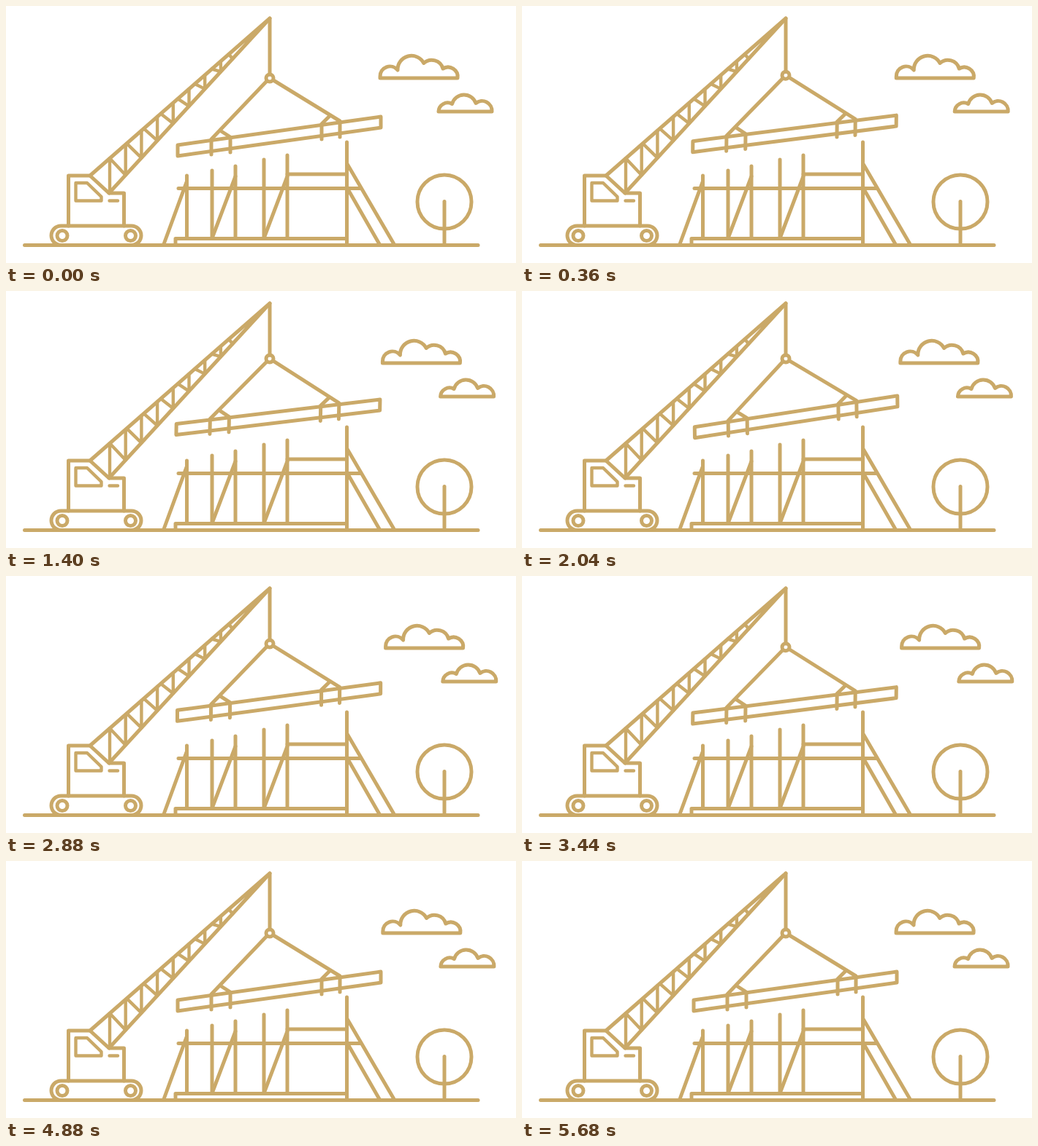
An HTML page that plays this animation: 698x353 px, repeating every 5.76 s.

```html
<!DOCTYPE html>
<html lang="en">
<head>
<meta charset="utf-8">
<title>Construction site</title>
<style>
  html, body { margin: 0; width: 100%; height: 100%; overflow: hidden; background: #fff; }
  svg { display: block; width: 100%; height: 100%; }
</style>
</head>
<body>
<svg viewBox="0 0 698 353" fill="none" stroke="#caa968" stroke-width="5" stroke-linecap="round" stroke-linejoin="round">
  <path d="M25.5 328.5H646"/>

  <g id="crane">
    <rect x="62" y="302" width="123" height="26.5" rx="13.2"/>
    <circle cx="77" cy="315.5" r="7"/>
    <circle cx="170.5" cy="315.5" r="7"/>
    <path d="M85.5 302V233H115L141 257H161.5V302"/>
    <path stroke-width="4.4" d="M95.5 243H111L130.5 262V267.5H95.5ZM141.5 267.5H153"/>
    <path d="M115 233L361 17L141 257"/>
    <path id="lattice" stroke-width="4.4"/>
  </g>

  <g id="frame">
    <path d="M232 327V319.5H466M236 250.5H485M385 231H466"/>
    <path d="M247.5 233V319M282 226V319M314 220V319M353 211V319M385 205V319M466.5 187V327"/>
    <path d="M247 242L216 327M314 234L282 319M385 234L353 319M467 217L531 327M467 250L511 327"/>
  </g>

  <g id="tree">
    <circle cx="600" cy="269" r="37"/>
    <path d="M600 268.5V328"/>
  </g>

  <path id="bigCloud" d="M512 99V97A13.5 13.5 0 0 1 536 88A19 19 0 0 1 571.8 78.5A16 16 0 0 1 598 86A13.2 13.2 0 0 1 618 99Z"/>
  <path id="smallCloud" d="M592 145A12.5 12.5 0 0 1 610.5 134.5A17 17 0 0 1 643 133.5A13.5 13.5 0 0 1 665 145Z"/>

  <path id="cable"/>
  <!-- Load drawn with the hook at 0,0 -->
  <g id="load">
    <circle r="5"/>
    <path d="M-4 4L-80 84V105M-68 72L-54 81V102"/>
    <path d="M5 3L96 59V81M83 51L71 63V84"/>
    <path d="M-126 92L152 53V68L-126 107Z"/>
  </g>
</svg>
<script>
  const LOOP = 5760;
  const HOOK_X = 361;

  // Each track is a list of [time in ms, value].
  const hookY = [[0, 99], [620, 93], [3000, 93], [3640, 99]];
  const swing = [[0, 0], [900, 2.05], [2240, -0.95], [3260, 0.85], [4000, 0]];
  const drift = [[0, 0], [3000, 1], [4000, 1], [5760, 0]];

  const el = id => document.getElementById(id);
  const ease = p => (1 - Math.cos(Math.PI * p)) / 2;

  function valueAt(track, t) {
    const next = track.findIndex(([time]) => time > t);
    if (next < 0) return track[track.length - 1][1];
    const [t0, v0] = track[next - 1];
    const [t1, v1] = track[next];
    return v0 + (v1 - v0) * ease((t - t0) / (t1 - t0));
  }

  function latticePath() {
    const top = x => 233 - (x - 115) * 216 / 246;
    const bottom = x => 257 - (x - 141) * 240 / 220;
    let d = '';
    for (let i = 0; i < 8; i++) {
      const x = 142 + i * 21.7;
      const start = x + i * 1.6;
      const end = Math.min(x + 21.7, 310);
      d += `M${x} ${top(x)}V${bottom(x)}M${start} ${top(start)}L${end} ${bottom(end)}`;
    }
    return d;
  }

  function draw(t) {
    const y = valueAt(hookY, t);
    const shift = valueAt(drift, t);
    el('cable').setAttribute('d', `M${HOOK_X} 17V${y - 5}`);
    el('load').setAttribute('transform', `translate(${HOOK_X} ${y}) rotate(${valueAt(swing, t)})`);
    el('bigCloud').setAttribute('transform', `translate(${7.6 * shift})`);
    el('smallCloud').setAttribute('transform', `translate(${5.8 * shift})`);
  }

  function tick() {
    draw(performance.now() % LOOP);
    requestAnimationFrame(tick);
  }

  el('lattice').setAttribute('d', latticePath());
  tick();
</script>
</body>
</html>
```
